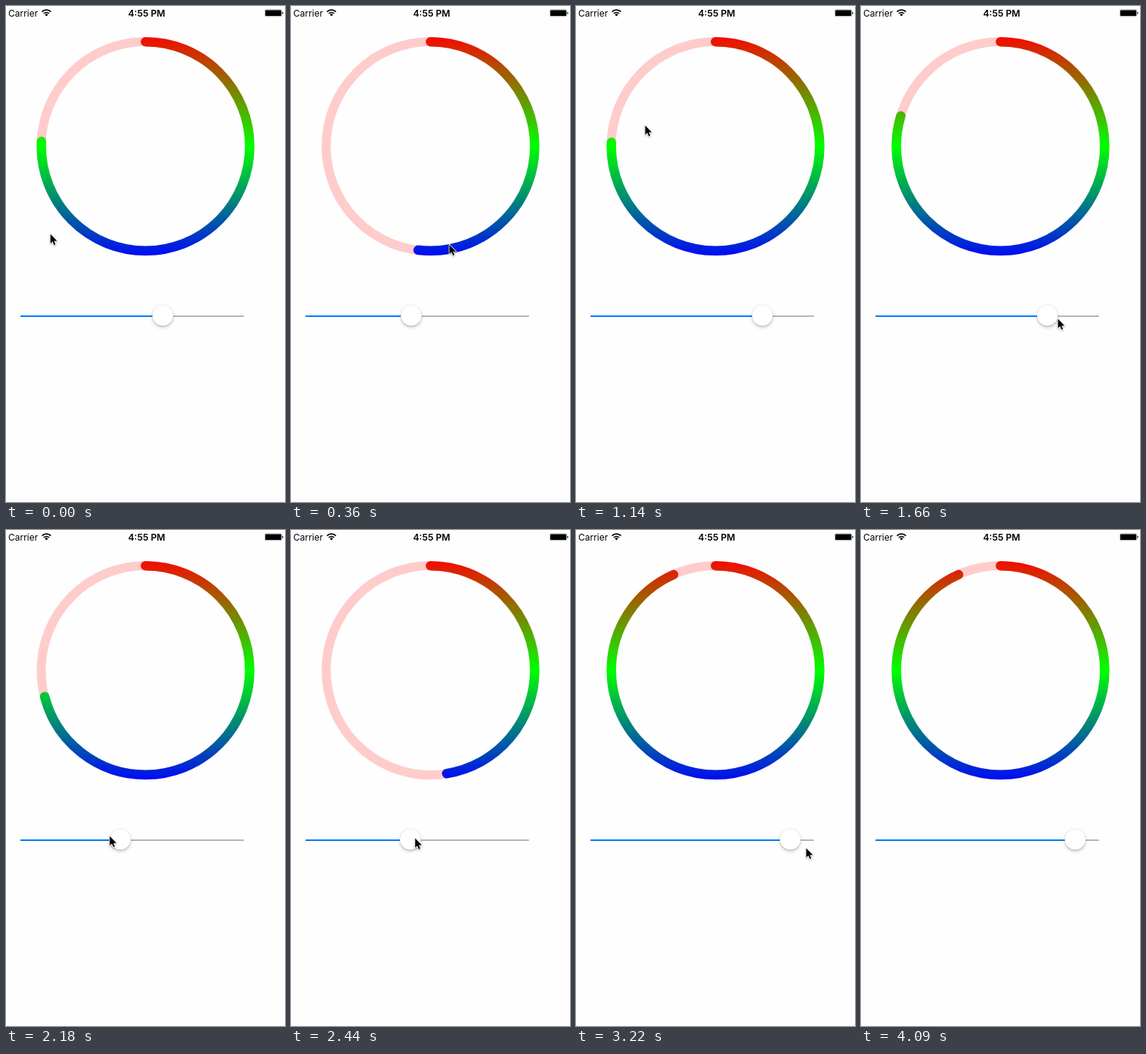
An HTML page for the animation above (4710 ms loop, 369 by 654 pixels).

```html
<!DOCTYPE html>
<html lang="en">
<head>
<meta charset="utf-8">
<title>Gradient ring slider</title>
<style>
  html, body { margin: 0; width: 100%; height: 100%; overflow: hidden; background: #fefefe; }
  svg { display: block; width: 369px; height: 654px; }
  text { font-family: Inter, Roboto, sans-serif; fill: #000; }
  #knob { filter: drop-shadow(0 1px .5px rgba(0, 0, 0, .14)) drop-shadow(0 2.5px 2px rgba(0, 0, 0, .18)); }
  #arrow { filter: drop-shadow(0 1px 1px rgba(0, 0, 0, .3)); }
</style>
</head>
<body>
<svg viewBox="0 0 369 654">
  <defs>
    <linearGradient id="rgb" gradientUnits="userSpaceOnUse" x1="0" y1="35" x2="0" y2="335">
      <stop offset="0" stop-color="#f00"/>
      <stop offset=".5" stop-color="#0f0"/>
      <stop offset="1" stop-color="#00f"/>
    </linearGradient>
  </defs>

  <!-- status bar -->
  <text x="3" y="14" font-size="12">Carrier</text>
  <text x="186" y="14" font-size="12.2" font-weight="600" text-anchor="middle">4:55 PM</text>
  <g fill="none" stroke="#000" stroke-width="1.7">
    <path d="M47.6 7.6a8.4 8.4 0 0 1 11.8 0"/>
    <path d="M49.9 10a5.1 5.1 0 0 1 7.2 0"/>
  </g>
  <path d="M53.5 13.6l-2.1-2.2a3 3 0 0 1 4.2 0z"/>
  <rect x="342.4" y="4.9" width="22.2" height="8.8" rx="1.6" fill="none" stroke="#000" stroke-opacity=".5" stroke-width=".6"/>
  <rect x="343" y="5.5" width="21" height="7.6" rx=".8"/>
  <path d="M365.4 7.6a1.8 1.8 0 0 1 0 3.4z"/>

  <circle cx="184.5" cy="185" r="138" fill="none" stroke="#fcc" stroke-width="12"/>
  <path id="ring" d="M184.5 47.2a137.8 137.8 0 0 1 0 275.6a137.8 137.8 0 0 1 0-275.6" pathLength="1"
        fill="none" stroke="url(#rgb)" stroke-width="12.5" stroke-linecap="round"/>

  <rect x="19" y="408" width="296" height="2" rx="1" fill="#b6b6b6"/>
  <rect id="fill" x="19" y="408" height="2" rx="1" fill="#007aff"/>
  <circle id="knob" cy="408" r="13.9" fill="#fff" stroke="#000" stroke-opacity=".13" stroke-width=".5"/>

  <path id="arrow" d="M.5 .5V12.8L3.3 10.2 5.3 14.8 7.2 14 5.3 9.5H9.3Z"
        stroke="#fff" stroke-width="1.6" stroke-linejoin="round" paint-order="stroke"/>
</svg>
<script>
  const LOOP = 4710, STEP = 86.7;   // ms
  const LAG = 5;                    // steps the ring takes to catch up
  const ORBIT_END = 13;

  // Turning points: step, slider value
  const slides = [[-1.5, .77], [2.4, .4], [4, .47], [11.7, .797],
                  [22, .797], [26, .38], [26.7, .38], [31.75, .934]];
  // Turning points: step, x, y
  const moves = [[ORBIT_END, 91, 157], [19, 260, 412], [21, 260, 412], [26.2, 119, 402],
                 [31.7, 304, 419], [40, 304, 419], [47.2, 280, 675]];

  const [ring, fill, knob, arrow] =
    ["ring", "fill", "knob", "arrow"].map(id => document.getElementById(id));

  const ease = p => (1 - Math.cos(Math.PI * p)) / 2;

  function sample(keys, s) {
    const i = keys.findIndex(k => k[0] > s);
    if (i <= 0) return keys.at(i).slice(1);
    const a = keys[i - 1], b = keys[i];
    const p = ease((s - a[0]) / (b[0] - a[0]));
    return a.slice(1).map((v, j) => v + (b[j + 1] - v) * p);
  }

  const slider = s => sample(slides, s)[0];

  // The ring shows the mean of the recent slider values.
  function ringValue(s, n = 40) {
    let sum = 0;
    for (let i = 0; i < n; i++) sum += slider(s - LAG * (i + .5) / n);
    return sum / n;
  }

  // The pointer first spirals in around the ring, then goes to the slider.
  function pointer(s) {
    if (s >= ORBIT_END) return sample(moves, s);
    const angle = 2 * Math.PI * slider(s + .13);
    const r = 90 + 81 * Math.exp(-s / 6);
    return [184.5 + r * Math.sin(angle), 185 - r * Math.cos(angle)];
  }

  function draw(time) {
    const s = Math.floor((time % LOOP) / STEP);
    const x = 33 + 268 * slider(s);
    ring.setAttribute("stroke-dasharray", ringValue(s) + " 2");
    knob.setAttribute("cx", x);
    fill.setAttribute("width", x - 19);
    arrow.setAttribute("transform", `translate(${pointer(s)})`);
  }

  const start = performance.now();
  function tick() {
    draw(performance.now() - start);
    requestAnimationFrame(tick);
  }
  tick();
</script>
</body>
</html>
```
